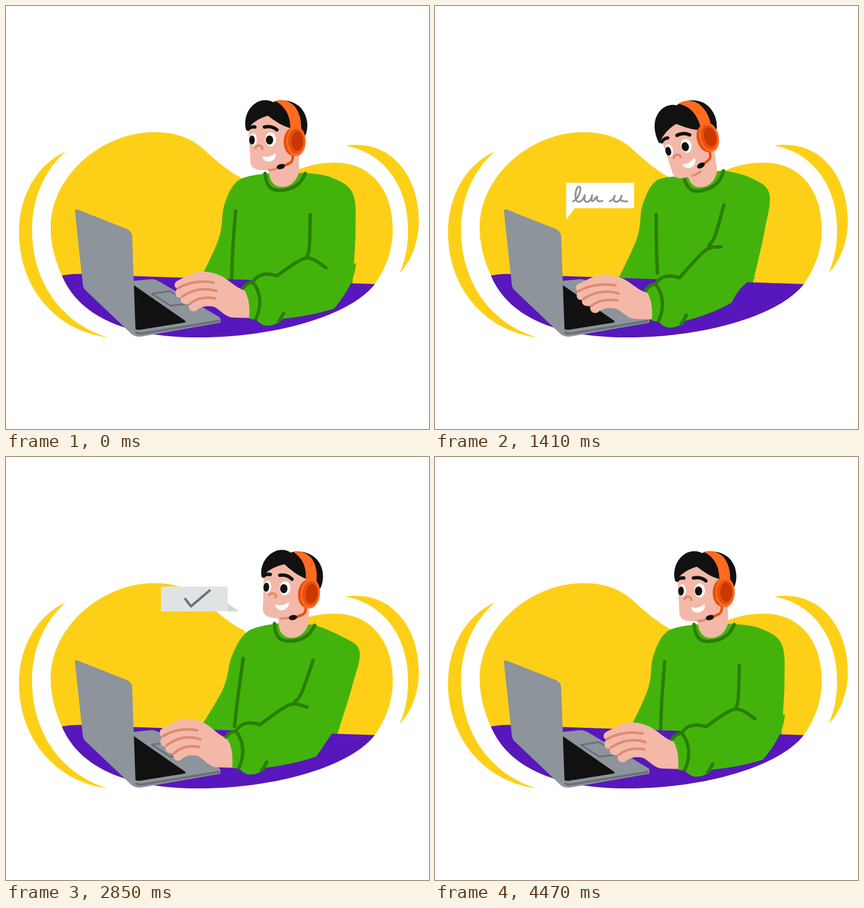
Write an HTML page with a canvas that moves like this. It is 748 by 748 pixels and loops after 4500 ms.

```html
<!DOCTYPE html>
<html lang="en">
<head>
<meta charset="utf-8">
<title>Support agent</title>
<style>
html, body { margin: 0; width: 100%; height: 100%; overflow: hidden; background: #fff; }
canvas { display: block; width: 100vw; height: 100vh; }
</style>
</head>
<body>
<canvas id="stage"></canvas>
<script>
const SIZE = 748, LOOP = 4500;
const canvas = document.getElementById('stage');
const ctx = canvas.getContext('2d');
const ratio = Math.max(1, window.devicePixelRatio || 1);
canvas.width = canvas.height = SIZE * ratio;

const C = {
  yellow: '#fdd017', purple: '#5817bc', green: '#43b30b', seam: '#2a7e00',
  grey: '#8d949b', dark: '#6a7078', black: '#111', skin: '#f3b8a8', blush: '#de8b6f',
  orange: '#ff6b1f', rim: '#e8500f', rust: '#c93800', white: '#fff', pale: '#e0e3e3'
};

// lean: head sideways, turn: head tilt, reach/drop: forearm, elbow: elbow sideways,
// hem: far arm sideways, curl: bent fingers.
const POSES = [
  { t: 0, lean: 0, turn: 0, reach: 0, drop: 0, elbow: 0, hem: 0, curl: 0 },
  { t: 570, lean: -2, turn: -.5, reach: -54, drop: -3, elbow: -54, hem: 13, curl: 1 },
  { t: 1050, lean: -22, turn: -14, reach: -39, drop: 6, elbow: -48, hem: -27, curl: -.4 },
  { t: 1770, lean: -34.5, turn: -16, reach: -54, drop: 1, elbow: -57, hem: -13, curl: -.4 },
  { t: 2310, lean: 22, turn: 6, reach: -12, drop: -1, elbow: -8, hem: 2, curl: 0 },
  { t: 3330, lean: 28, turn: 4, reach: -45, drop: -6, elbow: -47, hem: -11, curl: 1 }
];

const mix = (a, b, k) => a + (b - a) * k;
const smooth = k => k * k * (3 - 2 * k);
const bump = (t, center, width) => smooth(Math.max(0, 1 - Math.abs(t - center) / width));

function poseAt(t) {
  let i = POSES.length - 1;
  while (POSES[i].t > t) i--;
  const a = POSES[i], b = POSES[i + 1] || { ...POSES[0], t: LOOP };
  const k = smooth((t - a.t) / (b.t - a.t)), p = {};
  for (const key in a) p[key] = mix(a[key], b[key], k);
  // The chest follows the head, and the sleeve rises as the elbow comes in.
  p.chest = p.lean * .66;
  p.lift = -p.elbow / 55;
  p.slide = -p.turn * .5;
  return p;
}

// Smooth curve through points, as path data after a move or line command.
function spline(p) {
  let d = `${p[0]}`;
  for (let i = 0; i < p.length - 1; i++) {
    const a = p[i - 1] || p[i], b = p[i], c = p[i + 1], e = p[i + 2] || c;
    d += `C${b[0] + (c[0] - a[0]) / 6},${b[1] + (c[1] - a[1]) / 6} ` +
         `${c[0] - (e[0] - b[0]) / 6},${c[1] - (e[1] - b[1]) / 6} ${c}`;
  }
  return d;
}

const fill = (d, color) => { ctx.fillStyle = color; ctx.fill(new Path2D(d)); };
function line(d, color, width) {
  ctx.strokeStyle = color;
  ctx.lineWidth = width;
  ctx.stroke(new Path2D(d));
}
function oval(x, y, rx, ry, color, turn = 0) {
  ctx.fillStyle = color;
  ctx.beginPath();
  ctx.ellipse(x, y, rx, ry, turn, 0, 7);
  ctx.fill();
}
function group(draw) { ctx.save(); draw(); ctx.restore(); }

// Shift by (dx, dy) and turn around (x, y).
function pivot(x, y, dx, dy, deg) {
  ctx.translate(x + dx, y + dy);
  ctx.rotate(deg * Math.PI / 180);
  ctx.translate(-x, -y);
}

const BEAN = 'M79,392C79,300 170,223 262,223C300,223 328,234 348,252C375,277 400,297 420,306' +
  'L440,330L500,330L515,290C537,281 555,277 582,277C645,277 684,325 684,395C684,430 673,462 652,492' +
  'C610,546 480,586 340,586C225,586 132,555 99,477C86,448 79,420 79,392Z';

function backdrop() {
  fill(BEAN, C.yellow);
  fill('M106,257C55,280 23,335 23,400C23,500 90,575 180,586C100,562 46,490 46,395C46,340 68,290 106,257Z', C.yellow);
  fill('M600,247C680,235 730,300 730,380C730,415 718,450 696,472C708,445 711,420 711,395C711,315 665,258 600,247Z', C.yellow);
}

function torso(p) {
  const tilt = Math.sin(p.turn / 2 * Math.PI / 180) * 35;
  const sag = Math.max(0, p.chest) * .8;
  const left = (x, y, w) => [x + mix(p.chest, p.hem, w), y];
  const right = (x, y, w) => [x + mix(p.chest, p.elbow, w), y + sag * (1 - w)];
  const a = [
    [458 + p.chest, 296 - tilt], left(410, 309, 0), left(386, 352, .15),
    left(376, 412, .45), left(335, 500, 1)
  ];
  const b = [
    right(612, 500, 1), right(618, 400, .5), right(613, 331, .1),
    right(575, 303, 0), [529 + p.chest, 295 + tilt]
  ];
  fill(`M${spline(a)}L${spline(b)}Z`, C.green);
  line('M' + spline([
    [406 + p.chest * .8, 362 - p.chest * .35], [401 + p.chest * .5, 430], [399 + p.chest * .3, 482 - p.lift * 10]
  ]), C.seam, 6);
}

function table() {
  group(() => {
    ctx.clip(new Path2D(BEAN));
    fill('M90,479C110,473 130,473 150,475L660,492V600H90Z', C.purple);
  });
}

function laptop(lean) {
  fill('M215,487L258,483Q264,483 269,486L377,550Q380,552 379,560L242,584Q228,587 220,578Z', C.grey);
  fill('M215,486L316,556Q320,559 315,560L240,572Q232,574 226,570Z', C.black);
  line('M258,509L290,504L324,526L291,530Z', C.dark, 3);
  line('M229,577Q234,580 241,579L376,557', C.dark, 4);
  const x = v => v + lean, y = v => v - lean / 4;
  fill(`M${x(122)},${y(364)}Q${x(121)},${y(358)} ${x(127)},${y(360)}` +
    `L${x(213)},${y(394)}Q${x(222)},${y(398)} ${x(223)},${y(406)}` +
    'L229,573Q230,583 222,580L140,502Q137,499 136,494Z', C.grey);
}

function hand(p) {
  group(() => {
    ctx.translate(425 + p.reach, 525 + p.drop);
    ctx.scale(1 - p.curl * .05, 1 + p.curl * .1);
    ctx.translate(-425, -525);
    fill('M440,506L420,502C406,498 396,486 382,478C368,471 352,468 338,470C326,474 313,481 303,486' +
      'C296,490 297,498 303,500C297,506 299,517 309,516C307,524 314,529 323,527' +
      'C322,537 328,542 336,539C344,532 354,529 368,532C380,538 388,551 404,551L440,552Z', C.skin);
    line('M304,499Q333,483 367,489M311,514Q340,494 372,504M325,527Q342,512 370,517', C.blush, 4.5);
  });
}

function sleeve(p) {
  const { reach, drop, elbow, lift } = p;
  const at = (x, y) => `${x + reach},${y + drop}`;
  const hump = [479 + reach, 477 + drop];
  const bend = [530 + elbow, 446 - lift * 14], tip = [566 + elbow * 1.15, 463 - lift * 39];
  const start = [619 + elbow, 455 + lift * 28], low = [580 + elbow * 1.06, 535 - lift * 11];
  const edge = `M${at(419, 499)}Q${at(425, 490)} ${at(437, 488)}C${at(446, 472)} ${at(463, 472)} ${hump}`;
  fill(`${edge}L${bend}L${tip}L${start}Q${617 + elbow * 1.4},${492 - lift * 5} ${low}` +
    `Q${(low[0] + 492 + reach) / 2 + 6},${(low[1] + 552 + drop) / 2 + 4} ${at(490, 553)}` +
    `C${at(474, 568)} ${at(454, 570)} ${at(443, 555)}` +
    `L${at(430, 553)}Q${at(433, 517)} ${at(419, 499)}Z`, C.green);
  line(`${edge}M${at(437, 489)}C${at(450, 505)} ${at(453, 530)} ${at(442, 553)}` +
    `M${at(491, 543)}Q${at(487, 552)} ${at(482, 558)}`, C.seam, 6);
  const pit = (x, y, w, rise) => [x + mix(p.chest, elbow, w), y - lift * rise];
  line(`M${spline([hump, bend, tip])}` +
    `M${spline([pit(538, 369, .25, 18), pit(536, 430, .65, 25), pit(530, 446, .8, 23)])}`, C.seam, 6);
}

function collar(p) {
  group(() => {
    pivot(493.5, 296, p.chest, 0, p.turn / 2);
    fill('M458,296C460,318 468,327 485,327C507,327 523,315 529,296Z', C.green);
    fill('M465,255L518,255V295C512,313 500,320 488,320C474,320 467,310 465,296Z', C.skin);
    line('M458,296C460,318 468,327 485,326C507,325 522,315 529,296', C.seam, 6);
  });
}

function eyes(t) {
  const open = Math.min(1, Math.abs(t - 570) / 110);
  if (open < .2) {
    line('M430,238H437M460,237H470', '#543c38', 1);
    return;
  }
  oval(437, 236, 6.5, 11 * open, C.white);
  oval(468, 236, 9.5, 12.5 * open, C.white);
  oval(435, 237, 5, 8 * open, C.black);
  oval(466, 237, 6.5, 8 * open, C.black);
}

function mouth(t) {
  const worried = t > 2000 && t < 2700;
  fill(worried
    ? 'M452,269C453,261 461,258 467,261C470,263 468,268 465,266C459,264 457,270 452,269Z'
    : 'M453,266Q466,269 475,261Q478,260 477,265C474,278 456,279 453,266Z', C.white);
}

function head(p, t) {
  const s = p.slide;
  group(() => {
    pivot(511, 239, p.lean, p.turn * .45, p.turn);
    group(() => {
      ctx.translate(s * .25, s);
      fill('M429,212C429,235 432,255 432,275Q433,289 450,290L472,291Q500,285 508,262L508,195L460,180L440,190Z', C.skin);
      line('M465,290Q474,290 481,286', C.blush, 4);
    });
    // The fringe slides with the face, the crown stays.
    fill(`M425,${220 + s}C420,205 424,180 446,169C456,165 466,166 472,170C484,164 505,166 518,177` +
      `C533,190 536,212 530,228L500,245L503,${216 + s}C488,${212 + s} 475,${203 + s} 463,${194 + s}` +
      `C448,${198 + s} 434,${207 + s} 425,${220 + s}Z`, C.black);
    group(() => {
      ctx.translate(s * .25, s);
      eyes(t);
      line('M428,218Q433,213 440,214M457,214Q470,211 479,219', C.black, 6);
      line('M441,251Q444,246 449,247Q454,249 453,253', C.blush, 4);
      mouth(t);
    });
    fill('M476,168C484,164 502,167 511,178C519,189 522,200 522,216L503,218C503,195 495,178 476,168Z', C.orange);
    line('M507,262Q508,274 503,277T490,283', C.rim, 4.5);
    oval(486, 284, 7.5, 4.5, C.black, -.25);
    oval(506, 240, 15, 24, C.rim);
    oval(513, 239, 17, 26.5, C.orange);
    oval(513, 239, 14, 22, C.rim);
    oval(515, 239, 10.5, 17, C.rust);
  });
}

// Pop in with a small overshoot, hold, then shrink away.
function pop(t, from, to) {
  const grow = Math.min(1, Math.max(0, (t - from) / 150));
  const shrink = Math.min(1, Math.max(0, (to - t) / 180));
  return smooth(grow) * shrink * (1 + .075 * bump(t, from + 150, 130));
}

function bubble(x, y, scale, draw) {
  if (scale <= 0) return;
  group(() => { ctx.translate(x, y); ctx.scale(scale, scale); draw(); });
}

function bubbles(t) {
  bubble(232, 374 + (t - 1050) * .0095, pop(t, 900, 2640), () => {
    fill('M0,-65H120V-20H15L0,0Z', C.white);
    line('M12,-32C22,-37 29,-56 23,-58C16,-59 13,-31 22,-31C28,-31 31,-38 33,-43C31,-34 33,-31 37,-31' +
      'C42,-31 45,-38 46,-43C44,-34 45,-31 48,-33C52,-37 54,-42 55,-40C52,-33 58,-30 64,-33' +
      'M77,-32C82,-34 85,-39 86,-42C83,-34 85,-31 89,-31C94,-32 97,-38 98,-42C95,-34 97,-31 101,-33Q103,-31 108,-32',
      C.grey, 3.2);
  });
  bubble(412, 270 + (t - 2310) * .0057, pop(t, 2160, 3480), () => {
    fill('M-138,-44H-20V-14L0,0H-138Z', C.pale);
    fill('M-20,-14L0,0H-20Z', '#d3d6d6');
    line('M-95,-22L-85,-9L-52,-37', C.dark, 4.2);
  });
}

function render(t) {
  ctx.setTransform(ratio, 0, 0, ratio, 0, 0);
  ctx.fillStyle = C.white;
  ctx.fillRect(0, 0, SIZE, SIZE);
  ctx.lineCap = ctx.lineJoin = 'round';

  const p = poseAt(t);
  backdrop();
  torso(p);
  table();
  laptop(-8 * bump(t, 1050, 240));
  hand(p);
  sleeve(p);
  collar(p);
  head(p, t);
  bubbles(t);
}

const start = performance.now();
function tick() {
  render((performance.now() - start) % LOOP);
  requestAnimationFrame(tick);
}
tick();
</script>
</body>
</html>
```
